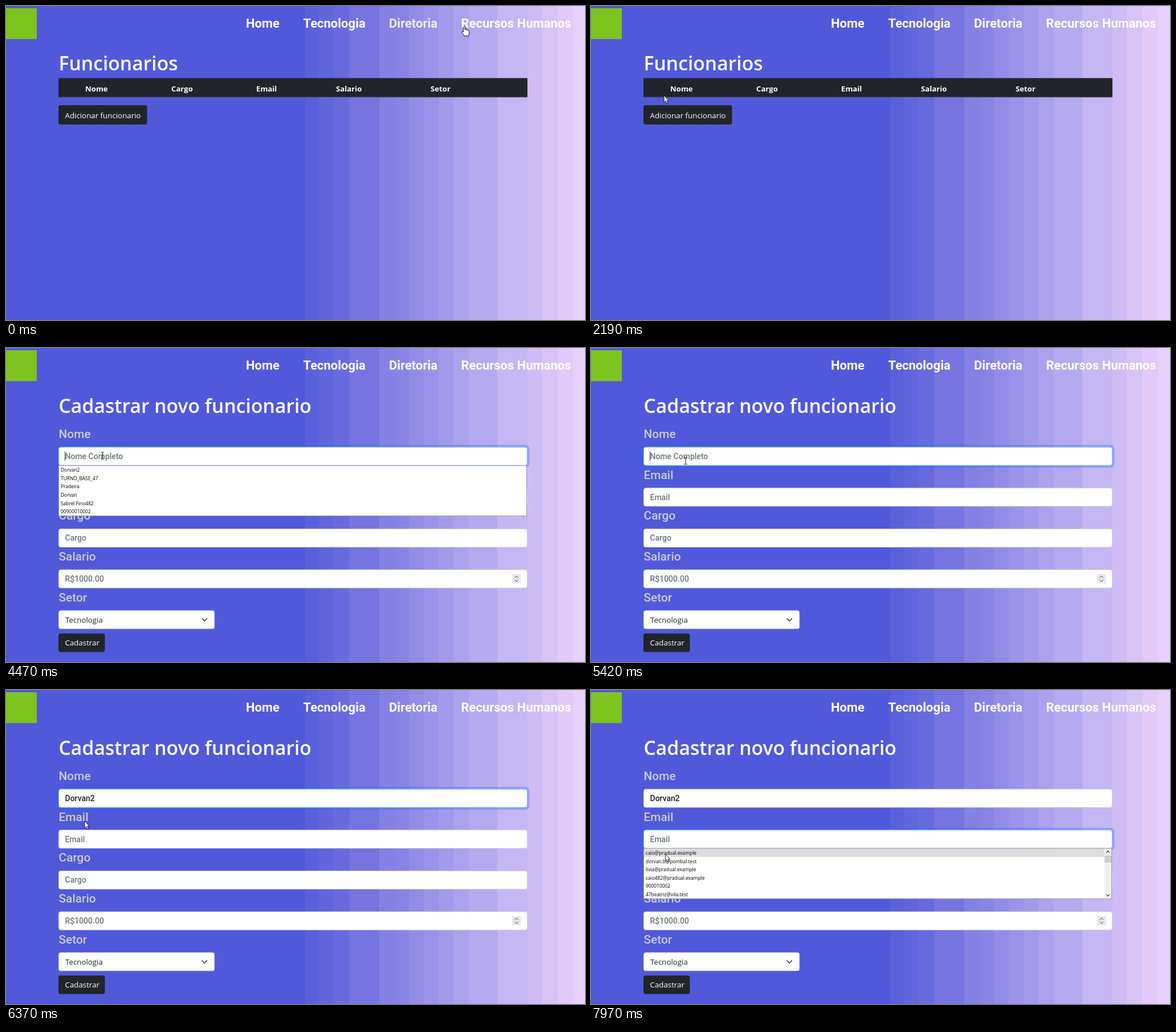
Animation, 1016 px wide and 551 px high, one loop 8000 ms. Source, as an HTML page:

```html
<!DOCTYPE html>
<html lang="pt-BR">
<head>
<meta charset="utf-8">
<title>Cadastro de funcionarios</title>
<style>
  html, body { margin: 0; width: 100%; height: 100%; overflow: hidden; background: #5059d9; }
  svg { display: block; width: 100vw; height: 100vh; }
  text { font-family: "Open Sans", "Noto Sans", sans-serif; white-space: pre; }
  .nav { font: 700 22px Roboto, sans-serif; fill: #fff; }
  .title { font-size: 33.7px; font-weight: 600; fill: #fff; }
  .head { font-size: 13.2px; font-weight: 700; fill: #fff; }
  .button { font-size: 13.3px; fill: #fff; }
  .label { font: 500 20.9px Roboto, sans-serif; fill: #ccc; }
  .hint, .value { font: 500 14px Roboto, sans-serif; fill: #6c757d; }
  .value { fill: #212529; }
  .option { font-size: 13.3px; fill: #212529; }
  .item { font-size: 8.4px; fill: #000; }
  .line { fill: none; stroke: #343a40; stroke-width: 1.5; stroke-linecap: round; stroke-linejoin: round; }
</style>
</head>
<body>
<svg id="stage" viewBox="0 0 1016 551" preserveAspectRatio="none"></svg>
<script>
const LOOP = 8000, TICK = 120, DARK = '#212529';
const ROW = 71.7;   // distance between form fields
const ITEM = 14.6;  // height of a suggestion

const rect = (x, y, w, h, fill, extra = '') =>
  `<rect x="${x}" y="${y}" width="${w}" height="${h}" fill="${fill}" ${extra}/>`;
const text = (x, y, cls, str, extra = '') =>
  `<text x="${x}" y="${y}" class="${cls}" ${extra}>${str}</text>`;
const group = (id, ...parts) => `<g id="${id}">${parts.join('')}</g>`;
const chevron = (x, y, dx, dy, width = 1.5) =>
  `<path class="line" style="stroke-width:${width}" d="M${x - dx} ${y - dy / 2}l${dx} ${dy} ${dx} ${-dy}"/>`;

const bands = [
  [0, '#5059d9'], [525, '#5961da'], [549, '#6066dc'], [575, '#676bde'], [602, '#7574e0'],
  [655, '#8580e3'], [683, '#8883e4'], [707, '#928ce7'], [733, '#9b93e9'], [759, '#a49aeb'],
  [785, '#aca1ed'], [812, '#b5a9f0'], [862, '#c5b6f4'], [915, '#cebcf5'], [940, '#d7c4f7'],
  [968, '#e1cafa'], [995, '#e8d0fd']
];
const background = bands.map(([x, color]) => rect(x, 0, 1016 - x, 551, color)).join('');

const header = rect(0, 4, 54, 54, '#7dc41f') +
  text(421, 38, 'nav', 'Home') +
  text(521.5, 38, 'nav', 'Tecnologia') +
  text(672, 38, 'nav', 'Diretoria', 'id="diretoria"') +
  text(798.5, 38, 'nav', 'Recursos Humanos', 'id="recursos"');

const columns = [[139, 'Nome'], [290, 'Cargo'], [439, 'Email'], [579, 'Salario'], [745, 'Setor']];
const tablePage = group('tablePage',
  text(92.5, 113, 'title', 'Funcionarios'),
  rect(92, 126.5, 823, 33.5, DARK),
  rect(92, 159.5, 823, .8, '#4b4f58'),
  ...columns.map(([x, name]) => text(x, 149.5, 'head', name)),
  rect(92, 174, 155.5, 34, DARK, 'rx="4"'),
  text(103.5, 196.5, 'button', 'Adicionar funcionario'));

const field = (i, label, hint) => {
  const y = 174 + i * ROW;
  return text(92.5, y - 16, 'label', label) +
    rect(92.5, y, 822, 32, '#fff', 'rx="3.5" stroke="#ced4da" stroke-width=".8"') +
    text(103.5, y + 20.8, 'hint', hint, `id="hint${i}"`);
};
const glow = i => rect(90.5, 172 + i * ROW, 826, 36, 'none',
    `id="glow${i}" rx="5" stroke="#0d6efd" stroke-opacity=".32" stroke-width="4"`);
const focusLine = i => rect(92.5, 174 + i * ROW, 822, 32, 'none',
    `id="focus${i}" rx="3.5" stroke="#86b7fe"`);
const caret = i => rect(103.2, 181.5 + i * ROW, .9, 16.5, '#222', `id="caret${i}"`);

const list = (i, items) => {
  const y = 206.4 + i * ROW;
  return group('list' + i,
    rect(92.5, y, 821, 88, '#fff', 'stroke="#9a9aa0" stroke-width=".9"'),
    rect(93, y + .4, 808, ITEM - .4, '#dedede', `id="mark${i}"`),
    ...items.map((name, n) => text(96, y + 10.8 + n * ITEM, 'item', name)),
    group('bar' + i,
      rect(901, y + .4, 12, 87.2, '#f0f0f0'),
      rect(901, y + 12.6, 12, 12.2, '#cdcdcd'),
      chevron(907, y + 5.8, 2.6, -2.8, 1.2),
      chevron(907, y + 82.2, 2.6, 2.8, 1.2)));
};

const formPage = group('formPage',
  text(92.5, 114, 'title', 'Cadastrar novo funcionario'),
  field(0, 'Nome', 'Nome Completo'),
  field(1, 'Email', 'Email'),
  field(2, 'Cargo', 'Cargo'),
  field(3, 'Salario', 'R$1000.00'),
  text(103.5, 194.8, 'value', 'Dorvan2', 'id="chosen"'),
  rect(888, 396.5, 15.5, 16.5, '#e9e9ed', 'rx="1"'),
  chevron(895.8, 401.5, 3, -2.8, 1), chevron(895.8, 408.5, 3, 2.8, 1),
  text(92.5, 445, 'label', 'Setor'),
  rect(92.5, 460.8, 273.2, 32, '#fff', 'rx="3.5" stroke="#ced4da" stroke-width=".8"'),
  text(104, 482, 'option', 'Tecnologia'),
  chevron(348.2, 477, 4.2, 4.4),
  rect(92, 501, 81.5, 32.5, DARK, 'rx="4"'),
  text(103.5, 522.3, 'button', 'Cadastrar'),
  glow(0), glow(1), focusLine(0), focusLine(1), caret(0), caret(1),
  list(0, ['Dorvan2', 'TURNO_BASE_47', 'Pradeira', 'Dorvan', 'Sabrel Fino482', '00900010002']),
  list(1, ['caio@pradual.example', 'dorvan.b@pombal.test', 'livia@pradual.example',
    'caio482@pradual.example', '900010002', '47beatriz@vila.test']));

const cursors =
  '<path id="arrow" d="M0 0V12.2L2.8 9.7 4.7 14 6.7 13.1 4.9 9H8.6Z" fill="#fff" stroke="#000" stroke-width=".8"/>' +
  '<path id="hand" d="M-1.4 10V1.2Q0-1 1.4 1.2V6Q3-.2 4 6.3 5.7 5 6.6 7 8.6 6 8.8 8.4V12Q8.6 14 7.3 16.6H.3Q-1.5 13.4-4 10.6-4.7 8.2-2.6 8.7Z" fill="#fff" stroke="#000" stroke-width=".9"/>' +
  '<path id="beam" d="M-2.6-6H-.6L0-5.4.6-6H2.6M0-5.4V5.4M-2.6 6H-.6L0 5.4.6 6H2.6" fill="none" stroke="#111" stroke-width="1"/>';

document.getElementById('stage').innerHTML =
  background + header + tablePage + formPage + group('cursor', cursors);
const el = id => document.getElementById(id);

// The pointer glides until GLIDE_END, then jumps from one pose to the next.
const GLIDE_END = 2500;
const poses = [
  [0, 804, 36, 'hand'], [120, 804, 36, 'hand'], [360, 700, 52, 'arrow'], [960, 455, 62, 'arrow'],
  [1680, 250, 110, 'arrow'], [1920, 150, 150, 'arrow'], [2160, 128, 157, 'arrow'],
  [2430, 156, 150, 'arrow'], [2580, 166, 182, 'hand'], [2700, 174, 199, 'hand'],
  [2850, 176, 198, 'hand'], [3000, 179, 197, 'arrow'], [3120, 181, 197, 'beam'],
  [3920, 169.5, 189, 'beam'], [5150, 169, 191.5, 'beam'], [5420, 166, 198, 'beam'],
  [5540, 164, 198, 'beam'], [5690, 160, 198, 'beam'], [5830, 155.5, 197.5, 'beam'],
  [5980, 149, 206, 'arrow'], [6100, 145, 212, 'arrow'], [6250, 142, 217, 'arrow'],
  [6370, 138, 230, 'arrow'], [6490, 136, 241, 'arrow'], [6610, 134.5, 253, 'beam'],
  [6760, 132.2, 267.5, 'beam'], [7610, 132, 276, 'arrow'], [7730, 131, 281, 'arrow'],
  [7850, 130.5, 285, 'arrow'], [7970, 130.5, 288, 'arrow']
];

function pointerAt(t) {
  const now = t < GLIDE_END ? Math.floor(t / TICK) * TICK : t;
  const i = poses.findLastIndex(p => p[0] <= now);
  const [start, x, y, shape] = poses[i];
  if (now >= GLIDE_END) return [x, y, shape];
  const [end, nextX, nextY] = poses[i + 1];
  const k = (now - start) / (end - start);
  return [x + (nextX - x) * k, y + (nextY - y) * k, shape];
}

const show = (id, on) => el(id).style.display = on ? '' : 'none';
const fade = (id, amount) => el(id).style.opacity = amount;
const ramp = (t, from, to) => Math.min(1, Math.max(0, (t - from) / (to - from)));

function draw(t) {
  const within = (from, to) => t >= from && t < to;
  const [x, y, shape] = pointerAt(t);
  el('cursor').setAttribute('transform', `translate(${x} ${y})`);
  for (const name of ['arrow', 'hand', 'beam']) show(name, name === shape);

  fade('diretoria', .84 + .16 * ramp(t, 120, 360));
  fade('recursos', 1 - .16 * (ramp(t, 120, 300) - ramp(t, 360, 600)));
  show('tablePage', t < 3000);
  show('formPage', t >= 3000);

  const focus = [
    within(4190, 7170) ? 1 : within(4070, 4190) ? .5 : within(7170, 7320) ? .4 : 0,
    t >= 7320 ? 1 : t >= 7170 ? .4 : 0
  ];
  focus.forEach((amount, i) => { fade('glow' + i, amount); fade('focus' + i, amount); });

  show('caret0', within(4070, 4620) || within(5150, 5690) || within(5830, 6250));
  show('caret1', within(7170, 7700));
  show('list0', within(4470, 5420) || within(5830, 6250));
  show('bar0', t >= 4620);
  show('mark0', t >= 5980);
  show('list1', t >= 7320);
  show('bar1', t >= 7460);
  show('mark1', t >= 7610);
  show('hint0', t < 6250);
  show('chosen', t >= 6250);
}

const begin = performance.now();
function frame() {
  draw((performance.now() - begin) % LOOP);
  requestAnimationFrame(frame);
}
frame();
</script>
</body>
</html>
```
